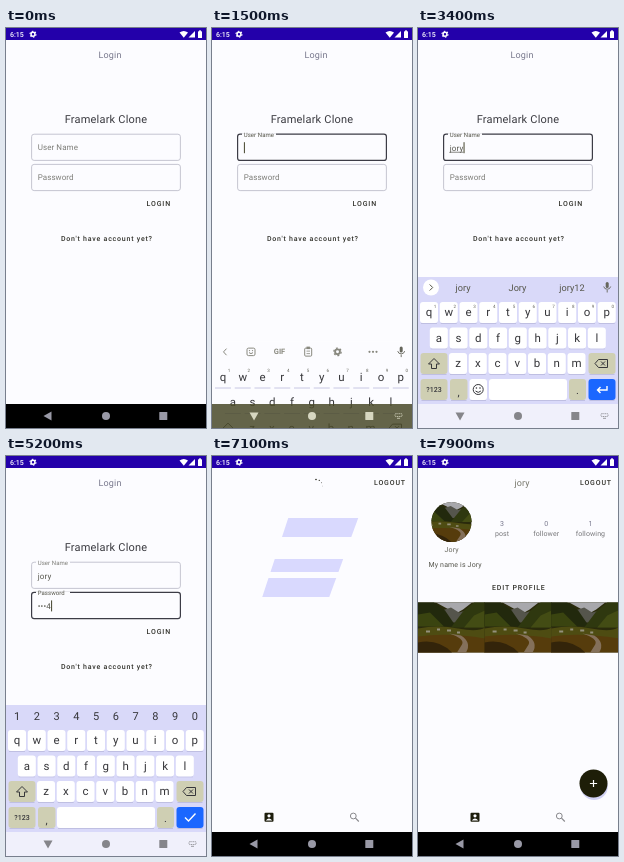
Write an HTML page that moves like this. It is 200 px wide and 400 px high and loops after 8 s.

```html
<!DOCTYPE html>
<html lang="en">
<head>
<meta charset="utf-8">
<style>
html, body { margin: 0; width: 100%; height: 100%; overflow: hidden; background: #fcfcff; }
svg { display: block; width: 100vw; height: 100vh; font-family: Roboto, sans-serif; text-rendering: geometricPrecision; }
</style>
</head>
<body>
<svg id="stage" viewBox="0 0 200 400"></svg>
<script>
const LOOP = 8000, STEP = 19.75, PAPER = '#fcfcff';
const USER = 'jory', PASS = '12345';
const userKeys = [2000, 2300, 2600, 3000], passKeys = [4200, 4500, 4800, 5000, 5300];
const focusUser = 1100, focusPass = 3600, submit = 5500;
const stage = document.getElementById('stage');
const pen = document.createElement('canvas').getContext('2d');

const ramp = (t, a, b) => {
  const p = Math.min(1, Math.max(0, (t - a) / (b - a)));
  return p * p * (3 - 2 * p);
};
const mix = (a, b, p) => a + (b - a) * p;
const text = (x, y, s, size, fill, extra = '') =>
  `<text x="${x}" y="${y + size * .35}" font-size="${size}" fill="${fill}" ${extra}>${s}</text>`;
const mid = (x, y, s, size, fill, extra = '') => text(x, y, s, size, fill, 'text-anchor="middle" ' + extra);
const rect = (x, y, w, h, fill, r = 0, extra = '') =>
  `<rect x="${x}" y="${y}" width="${w}" height="${h}" rx="${r}" fill="${fill}" ${extra}/>`;
const dot = (x, y, r, fill, extra = '') => `<circle cx="${x}" cy="${y}" r="${r}" fill="${fill}" ${extra}/>`;
const path = (d, fill, extra = '') => `<path d="${d}" fill="${fill}" ${extra}/>`;
const line = (d, color, w = 1) => path(d, 'none', `stroke="${color}" stroke-width="${w}"`);
const group = (s, attrs) => `<g ${attrs}>${s}</g>`;
const button = (x, y, s, spacing) =>
  text(x, y, s, 7, '#30302a', `font-weight="500" letter-spacing="${spacing}"`);

const gear = (x, y, r, color) =>
  dot(x, y, r * .65, 'none', `stroke="${color}" stroke-width="${r * .5}"`) +
  dot(x, y, r, 'none', `stroke="${color}" stroke-width="${r * .35}" stroke-dasharray="${r * .52}"`);

const mic = rect(187.7, 254, 3, 6, '#66665c', 1.5) +
  line('M185.7 258.5a3.6 3.6 0 0 0 7 0M189.2 262v2.5', '#66665c', .9);

function statusBar() {
  return rect(0, 0, 200, 12, '#2300aa') +
    text(4, 6.2, '6:15', 7, '#fff', 'font-weight="500"') + gear(27, 6.2, 3, '#fff') +
    path('M173.5 4.6Q177.8 1.4 182 4.6L177.8 9.8Z', '#fff') +
    path('M182.5 9.6L189 3V9.6Z', '#fff') +
    rect(192, 3.3, 4, 6.7, '#fff', .5) + rect(193, 2.4, 2, 1.5, '#fff');
}

function navBar(p) {
  const tone = (c, e) => Math.round(c * p ** e);
  const icon = p > .2 && p < .8 ? '#d6d6c0' : p >= .8 ? '#85858a' : '#9999a6';
  const turn = -90 * Math.min(1, p * 2);
  let s = rect(0, 376, 200, 24, `rgb(${tone(240, 1.7)},${tone(240, 1.7)},${tone(251, 2.6)})`, 0,
    `opacity="${1 - .15 * Math.sin(Math.PI * p)}"`) +
    group(path('M37.5 388L45.5 383.5V392.5Z', icon), `transform="rotate(${turn} 42 388)"`) +
    dot(100, 388, 4, icon) + rect(153.3, 384, 8, 8, icon, .5);
  if (p > .3) s += rect(183, 385.7, 7, 2.8, 'none', .5, `stroke="${icon}" stroke-width=".8" stroke-dasharray="1.2 .6"`) +
    line('M185 390.3h3', icon, .8);
  return s;
}

function field(y, name, value, focused, lift, caret, dim, composing) {
  const size = mix(8, 6, lift), labelY = mix(y + 13.2, y + .6, lift);
  let s = rect(25.6, y, 148.8, 26.2, PAPER, 2.5,
    `stroke="${focused ? '#3c3c46' : '#c0c0cc'}" stroke-width="${focused ? 1.2 : .9}"`);
  if (lift > 0) s += rect(30, y - 1, 34 * lift, 2, PAPER);
  s += text(31.7, labelY, name, size, focused ? '#55554a' : '#7d7d78', 'letter-spacing=".08"');
  pen.font = '8px Roboto, sans-serif';
  const w = pen.measureText(value).width + value.length * .15;
  s += text(31.7, y + 13.6, value, 8, dim ? '#b6b6b6' : '#55554c', 'letter-spacing=".15"');
  if (composing && value) s += rect(31.7, y + 17.6, w, .7, '#55554c');
  if (caret) s += rect(31.9 + w, y + 8, 1, 11, '#44442c');
  return s;
}

// Dots start one after another, clockwise from the top.
function spinner(x, y, radius, size, t) {
  let s = '';
  for (let i = 0; i < 12; i++) {
    const age = t - i * 100, a = (i * 30 - 90) * Math.PI / 180;
    if (age > 0) s += dot(x + radius * Math.cos(a), y + radius * Math.sin(a),
      size * Math.abs(Math.sin(Math.PI * age / 1200)), '#14140a');
  }
  return s;
}

function toolbar() {
  const c = '#88887e';
  return line('M14.5 256l-3 3.3 3 3.3', c) +
    rect(35, 255.5, 8, 7.5, 'none', 1.5, `stroke="${c}"`) + dot(37.5, 258, .7, c) + dot(40.5, 258, .7, c) +
    line('M37 260q2 2 4 0', c) +
    mid(67.5, 259.2, 'GIF', 7.5, c, 'font-weight="700"') +
    rect(92.7, 255.5, 7, 8, 'none', 1, `stroke="${c}"`) + rect(94.5, 254, 3.4, 2.5, c) +
    line('M94.5 258.5h3.5M94.5 261h3.5', c, .8) +
    gear(125.5, 259.2, 3.7, c) +
    [157.5, 161, 164.5].map(x => dot(x, 259.2, 1.1, c)).join('') + mic;
}

function keyboard(shown, typed, secret, pressed) {
  const solid = `opacity="${shown ** 6}"`, grey = '#cfcfb3', ink = '#36363a';
  const key = (x, y, w, fill = '#fff') => rect(x + 1, y + 21, w - 2, .8, '#b9b9dc') + rect(x, y, w, 21, fill, 3, solid);
  let s = rect(0, 249, 200, 151, PAPER) + rect(0, 249, 200, 151, '#d9d9f9', 0, solid);
  if (secret) [...'1234567890'].forEach((c, i) => s += mid(11 + i * STEP, 260.5, c, 11, ink));
  else if (typed) {
    s += dot(13, 259.5, 8, '#fff') + line('M11.7 256.5l3 3-3 3', '#555548');
    [typed, typed[0].toUpperCase() + typed.slice(1), typed + '12']
      .forEach((w, i) => s += mid(45 + i * 54.5, 260, w, 9.2, '#55554a'));
    s += mic;
  } else s += toolbar();
  [['qwertyuiop', 11, 274], ['asdfghjkl', 20.8, 299.5], ['zxcvbnm', 40, 325]].forEach(([row, x0, y], r) =>
    [...row].forEach((c, i) => {
      const x = x0 + i * STEP;
      s += key(x - 9, y, 18, c === pressed ? '#dcdcec' : '#fff') + mid(x, y + 10.3, c, 11.5, ink);
      if (!r && !secret) s += mid(x + 6, y + 4, (i + 1) % 10, 4.5, '#66665c');
    }));
  s += key(2.5, 325, 27, grey) + line('M16 330.5l-5.5 5.5h3v4.5h5V336h3Z', ink) +
    key(170.5, 325, 27, grey) + line('M180.5 331.5h9v8h-9l-3.5-4ZM183 333.5l4 4m0-4l-4 4', ink) +
    key(2.5, 351, 27, grey) + mid(16, 361.8, '?123', 7, ink, 'font-weight="500"') +
    key(32, 351, 17.5, grey) + mid(40.5, 364, ',', 11, ink) +
    key(151, 351, 17, grey) + mid(159.5, 362, '.', 11, ink);
  if (secret) s += key(51, 351, 98);
  else s += key(51.5, 351, 17.5) + dot(60.2, 361.5, 5, 'none', `stroke="${ink}"`) +
    dot(58.4, 360, .8, ink) + dot(62, 360, .8, ink) + line('M57.5 363q2.7 2.8 5.4 0', ink) + key(71, 351, 78);
  s += key(170.5, 351, 27, '#1b67ff') +
    line(secret ? 'M179 361.5l3.5 3.5 7-7.5' : 'M189 358v4h-9.5m3-3l-3 3 3 3', '#fff', 1.4);
  return s;
}

function login(t) {
  const user = USER.slice(0, userKeys.filter(k => t >= k).length);
  const n = passKeys.filter(k => t >= k).length;
  const pass = n ? '•'.repeat(n - 1) + (t < submit ? PASS[n - 1] : '•') : '';
  const onPass = t >= focusPass && t < submit, onUser = t >= focusUser && t < focusPass;
  const last = Math.max(...[focusUser, focusPass, ...userKeys, ...passKeys].filter(k => k <= t));
  const blink = (t - last) % 1000 < 500, busy = t >= 5700;
  const shown = ramp(t, 1250, 1750) - ramp(t, submit, 5800);
  let s = mid(104, 27, 'Login', 9, '#77778c', 'letter-spacing=".2"') +
    mid(100, 90.7, 'Framelark Clone', 11, '#3a3a40', 'letter-spacing=".2"') +
    field(106.2, 'User Name', user, onUser, ramp(t, focusUser, focusUser + 200), onUser && blink, busy, onUser) +
    field(136.4, 'Password', pass, onPass, ramp(t, focusPass, focusPass + 200), onPass && blink, busy) +
    button(140.5, 175.5, 'LOGIN', .9) + button(55, 210.2, 'Don\'t have account yet?', .78);
  if (busy) s += spinner(100, 193, 15.7, 2.9, t - 5700);
  if (shown > 0) {
    const i = userKeys.findIndex(k => t >= k && t < k + 100);
    s += group(keyboard(shown, user, t >= 3900, USER[i]), `transform="translate(0 ${(1 - shown) * 130})"`);
  }
  return s + navBar(shown);
}

// Valley scene in a 67 by 50 box: hazy gap between slopes, meadow below.
const scene = rect(0, 0, 67, 50, '#2a2a0c') +
  path('M18 0H54L45 7 38 11 29 6Z', '#a8a8ac') +
  path('M24 8L33 5 41 10 48 8 44 20H27Z', '#55554c') +
  path('M0 0H16L27 8 38 24H0Z', '#22290d') + path('M0 12L12 10 26 24H0Z', '#3a4410') +
  path('M67 0H56L45 9 33 25H67Z', '#2f380f') + path('M67 8L56 13 46 25H67Z', '#434c14') +
  path('M0 26Q20 22 40 26T67 25V38L0 35Z', '#4e4c12') +
  path('M8 28h4v2H8ZM19 26h3v2h-3ZM29 27h4v2h-4ZM39 29h3v2h-3Z', '#94907c') +
  path('M0 34Q30 30 67 36V50H0Z', '#563c0c') +
  path('M0 40Q20 36 34 50H0Z', '#33240a') +
  path('M31 31Q47 36 44 42L39 50H48Q54 40 43 33Z', '#84705a');
const defs = `<defs><g id="scene">${scene}</g>
  <clipPath id="face"><circle cx="33.5" cy="66" r="20"/></clipPath>
  <clipPath id="bars"><path d="M20 62H180V81H20ZM20 103H180V116H20ZM20 122H180V141H20Z"/></clipPath></defs>`;

function profile(t) {
  let s = rect(0, 12, 200, 364, PAPER) + button(162, 27, 'LOGOUT', .85) +
    rect(52.5, 356.8, 9, 9, '#1d1d0c', 1) + dot(57, 359.8, 1.6, PAPER) + path('M53.8 364.5q3.2-3.8 6.4 0Z', PAPER) +
    dot(141.3, 360, 2.9, 'none', 'stroke="#88888c" stroke-width="1"') + line('M143.5 362.2l3.3 3.3', '#88888c', 1.2);
  if (t < 7200) {
    const x = (t - 7100) * .25;
    return s + group(path(`M${76 + x} 62H${146 + x}L${117 + x} 141H${50 + x}Z`, '#d9d9fe'), 'clip-path="url(#bars)"') +
      spinner(104, 30, 6.5, .9, t - 6700);
  }
  s += mid(104, 27, USER, 9, '#77776c', 'letter-spacing=".1"');
  [[3, 'post'], [0, 'follower'], [1, 'following']].forEach(([n, name], i) => {
    s += mid(84 + i * 44.2, 67.5, n, 7, '#77778c') + mid(84 + i * 44.2, 77.3, name, 7, '#77777a', 'letter-spacing=".1"');
  });
  s += mid(33.7, 93.5, 'Jory', 7, '#66665c', 'letter-spacing=".15"') +
    text(10.5, 108.5, 'My name is Jory', 7, '#55554c', 'letter-spacing=".15"') +
    button(74, 131.7, 'EDIT PROFILE', .85);
  let photos = group('<use href="#scene" transform="translate(4 46) scale(.87 .8)"/>', 'clip-path="url(#face)"');
  for (let i = 0; i < 3; i++) photos += `<use href="#scene" x="${i * 66.6}" y="146.4"/>`;
  s += group(photos, `opacity="${ramp(t, 7250, 7500)}"`);
  const fab = dot(.7, 3, 13.6, '#d2d2f4') + dot(0, 0, 14, '#1e1e08') + line('M-3.6 0h7.2M0-3.6v7.2', '#fff', 1.2);
  return s + group(fab, `transform="translate(175.5 327.5) scale(${ramp(t, 7250, 7500)})"`);
}

function draw() {
  const t = performance.now() % LOOP;
  let s = defs + rect(0, 0, 200, 400, PAPER) + login(t);
  if (t > 6500) s += group(profile(t), `opacity="${ramp(t, 6500, 6750)}"`);
  stage.innerHTML = s + statusBar();
  requestAnimationFrame(draw);
}
draw();
</script>
</body>
</html>
```
